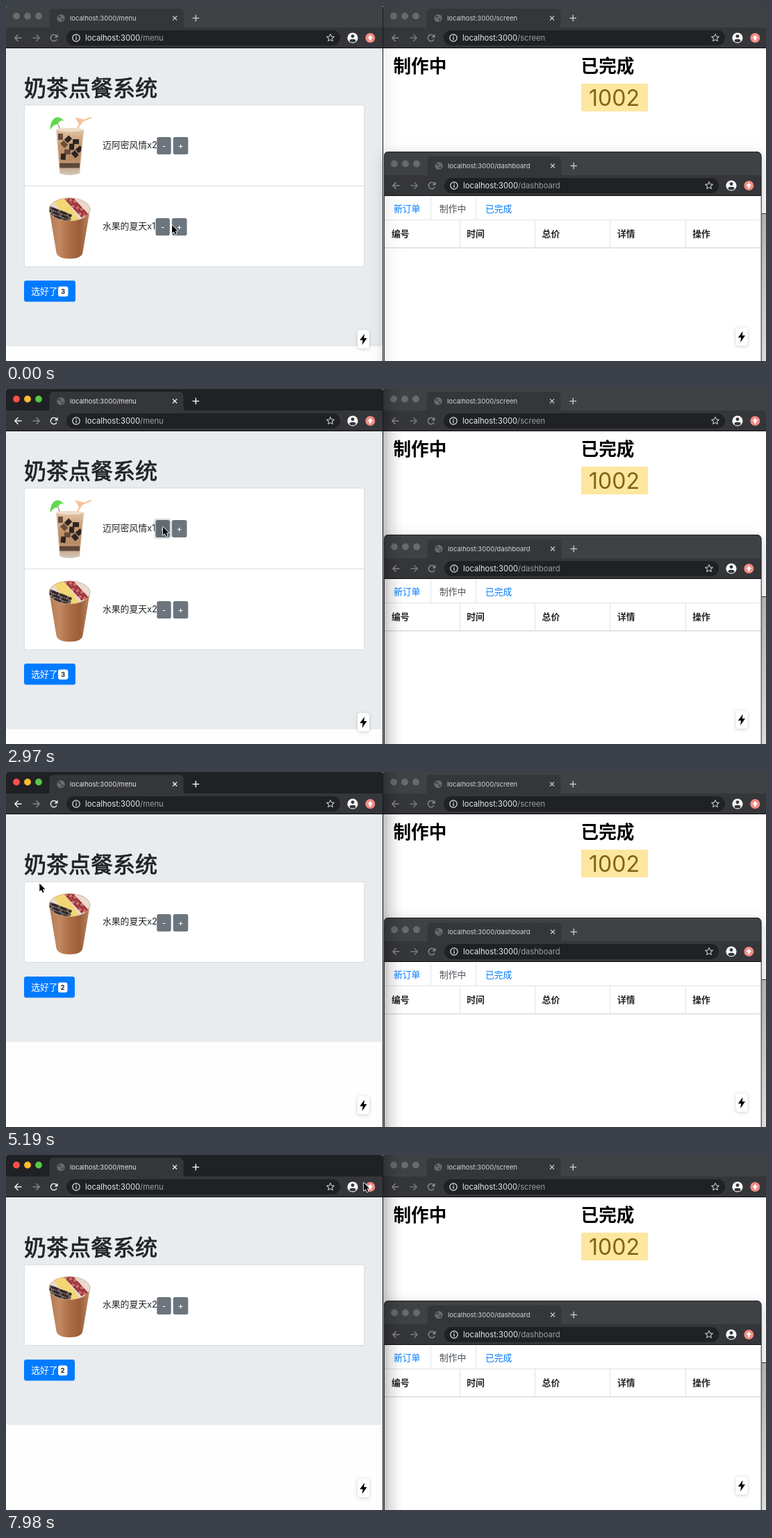
An HTML page with a canvas that plays this animation: 1094 px wide and 512 px high, repeating every 8000 ms.

```html
<!DOCTYPE html>
<html lang="zh-CN">
<head>
<meta charset="utf-8">
<title>奶茶点餐系统</title>
<style>
html, body { margin: 0; width: 100%; height: 100%; overflow: hidden; background: #fff; }
canvas { display: block; }
</style>
</head>
<body>
<canvas id="stage" width="1094" height="512"></canvas>
<script>
const g = document.getElementById('stage').getContext('2d');
const LOOP = 8000;
const FONT = 'Inter, "Noto Sans CJK SC", "Noto Sans CJK JP", "Noto Sans CJK", sans-serif';
const BLUE = '#007bff', INK = '#212529', BAR = '#35363a';

const clamp = v => Math.max(0, Math.min(1, v));
const ramp = (t, start, len) => clamp((t - start) / len);
const mix = (a, b, k) => 'rgb(' + a.map((v, i) => Math.round(v + (b[i] - v) * k)) + ')';

function rect(x, y, w, h, color) {
  g.fillStyle = color;
  g.fillRect(x, y, w, h);
}

function box(x, y, w, h, r, fill, stroke, lw = 1) {
  g.beginPath();
  g.roundRect(x, y, w, h, r);
  if (fill) { g.fillStyle = fill; g.fill(); }
  if (stroke) { g.strokeStyle = stroke; g.lineWidth = lw; g.stroke(); }
}

function disc(x, y, r, fill) {
  oval(x, y, r, r, fill);
}

function oval(x, y, rx, ry, fill, turn = 0) {
  g.beginPath();
  g.ellipse(x, y, rx, ry, turn, 0, 7);
  g.fillStyle = fill;
  g.fill();
}

function poly(pts, fill) {
  g.beginPath();
  for (let i = 0; i < pts.length; i += 2) g.lineTo(pts[i], pts[i + 1]);
  g.closePath();
  g.fillStyle = fill;
  g.fill();
}

function line(pts, color, lw = 1) {
  g.beginPath();
  for (let i = 0; i < pts.length; i += 2) g.lineTo(pts[i], pts[i + 1]);
  g.strokeStyle = color;
  g.lineWidth = lw;
  g.stroke();
}

function text(s, x, y, size, color, weight = 400, align = 'left') {
  g.font = `${weight} ${size}px ${FONT}`;
  g.textAlign = align;
  g.fillStyle = color;
  g.fillText(s, x, y);
  return g.measureText(s).width;
}

function at(x, y, draw) {
  g.save();
  g.translate(x, y);
  draw();
  g.restore();
}

function fade(x0, y0, x1, y1, ...colors) {
  const grad = g.createLinearGradient(x0, y0, x1, y1);
  colors.forEach((c, i) => grad.addColorStop(i / (colors.length - 1), c));
  return grad;
}

function arrow(x, y, dir, color) {
  at(x, y, () => {
    g.scale(dir, 1);
    line([-4.5, 0, 5, 0], color, 1.5);
    line([0, -4.7, -4.7, 0, 0, 4.7], color, 1.5);
  });
}

function star(x, y) {
  g.beginPath();
  for (let i = 0; i < 10; i++) {
    const a = i * Math.PI / 5 - Math.PI / 2, r = i % 2 ? 2.6 : 5.6;
    g.lineTo(x + r * Math.cos(a), y + r * Math.sin(a));
  }
  g.closePath();
  g.strokeStyle = '#c4c7ca';
  g.lineWidth = 1.1;
  g.stroke();
}

// Browser title bar and toolbar
function browser(x, y, w, path, active) {
  const lights = active ? ['#fd4f4b', '#fdbd2e', '#55c944'] : Array(3).fill('#686b6e');
  const icon = active ? '#f1f3f4' : '#8b8d90';
  const dim = active ? '#85878b' : '#777a7d';
  at(x, y, () => {
    box(0, -3, w, 40, [6, 6, 0, 0], active ? '#202124' : '#3f4245');
    rect(0, 31, w, 29, BAR);
    rect(0, 60, w, 1, '#0c0c0d');
    box(62.5, 4, 193, 28, [6, 6, 0, 0], BAR);
    lights.forEach((c, i) => disc(15 + 16 * i, 14.5, 4.9, c));

    disc(79, 17.5, 5.6, '#686b6f');
    oval(77, 15.5, 2.5, 1.5, '#45474a', .6);
    oval(81, 19.5, 2, 1.6, '#45474a', -.6);
    text('localhost:3000' + path, 92, 21, 9.5, active ? '#e4e6e8' : '#d2d4d6');
    const mark = active ? '#f1f3f4' : '#c5c7c9';
    line([240, 14.5, 246, 20.5], mark, 1.3);
    line([246, 14.5, 240, 20.5], mark, 1.3);
    line([268.5, 17.5, 278, 17.5], mark, 1.4);
    line([273.25, 12.8, 273.25, 22.2], mark, 1.4);

    arrow(17.5, 46, 1, icon);
    arrow(43.5, 46, -1, dim);
    g.beginPath();
    g.arc(69, 46, 4.6, .5, 5.5);
    g.strokeStyle = icon;
    g.lineWidth = 1.5;
    g.stroke();
    poly([74.5, 40.5, 74.5, 45.5, 69.5, 45.5], icon);

    box(87, 35, w - 148, 22, 11, '#202124');
    g.beginPath();
    g.arc(101, 46, 5.2, 0, 7);
    g.strokeStyle = '#e8eaed';
    g.lineWidth = 1.2;
    g.stroke();
    rect(100.4, 45.2, 1.3, 3.6, '#e8eaed');
    rect(100.4, 42.8, 1.3, 1.4, '#e8eaed');
    const tw = text('localhost:3000', 114, 50, 11.2, '#e8eaed');
    text(path, 114 + tw, 50, 11.2, '#9aa0a6');
    star(w - 75, 46);

    const a = w - 43, u = w - 17.7;
    disc(a, 46, 7.6, '#f6f7f8');
    disc(a, 43.6, 2.4, BAR);
    oval(a, 50, 4.5, 2.3, BAR);
    disc(u, 46, 7, '#f28b82');
    poly([u, 42, u + 4, 46.2, u + 1.6, 46.2, u + 1.6, 49.6, u - 1.6, 49.6, u - 1.6, 46.2, u - 4, 46.2], '#fff');
  });
}

function bolt(x, y) {
  g.save();
  g.shadowColor = 'rgba(0,0,0,.2)';
  g.shadowBlur = 5;
  g.shadowOffsetY = 1;
  box(x - 8.5, y - 13.5, 17, 26.5, 4, '#fff');
  g.restore();
  at(x, y, () => poly([1.5, -8, -5.2, 1.3, -.9, 1.3, -1.9, 8.3, 5, -1.7, .8, -1.7], '#000'));
}

function icedTea(x, y) {
  at(x, y, () => {
    line([-20, 21, -14, 38], '#8a6a4a', 1);
    g.beginPath();
    g.moveTo(-29, 36);
    g.bezierCurveTo(-29, 20, -19, 12, -9, 23);
    g.quadraticCurveTo(-15, 21, -18, 28);
    g.quadraticCurveTo(-24, 28, -29, 36);
    g.fillStyle = '#62d850';
    g.fill();
    line([8, 38, 16, 24, 30, 18], '#f4c8a0', 2.4);
    poly([7, 18, 19, 21, 14, 31], '#f7c29a');

    const cup = new Path2D('M-20 36H19L13 99Q-1 104-15 99Z');
    g.fillStyle = fade(0, 36, 0, 101, '#e0c3a2', '#c59a70', '#b98a62', '#d5c8bd');
    g.fill(cup);
    g.save();
    g.clip(cup);
    for (let i = 0; i < 9; i++) {
      at(-14 + (i * 11) % 28, 46 + i * 3.6, () => {
        g.rotate(i * .8);
        rect(-3.6, -4.6, 7, 9, i % 3 ? '#2b2425' : '#6a4b3a');
      });
    }
    rect(-17, 84, 34, 7, 'rgba(60,40,32,.75)');
    g.restore();
    oval(-.5, 36, 19.5, 2.8, '#eddcc8');
    line([-20, 36, -15, 99], '#e6d3c0', 1);
    line([19, 36, 13, 99], '#d3b79b', 1);
  });
}

function fruitTea(x, y) {
  at(x, y, () => {
    const cup = new Path2D('M-30 36L-20 96Q-18 105-1 105Q16 105 18 96L28 36Z');
    g.fillStyle = fade(-30, 0, 28, 0, '#b67a54', '#c28a62', '#ae6d45', '#9b5e3a', '#b98561');
    g.fill(cup);
    const lid = new Path2D();
    lid.ellipse(-1, 34, 29.5, 16.5, 0, 0, 7);
    g.fillStyle = '#ead9cd';
    g.fill(lid);
    g.save();
    g.clip(lid);
    poly([-24, 22, -10, 16, 14, 50, -3, 52], '#f3d672');
    // Berries lie in curved bands across the lid
    for (let i = 0; i < 30; i++) {
      const row = i % 3, k = Math.floor(i / 3);
      disc(-28 + k * 3.1 - row, 32 + row * 4.4 + k * 1.2, 2.3, i % 4 ? '#30292b' : '#66595a');
      disc(-6 + k * 2.5 + row * 4, 19 + k * 2.7 - row * .8, 2.1, i % 4 ? '#9c3038' : '#c96f70');
    }
    g.restore();
    g.strokeStyle = 'rgba(205,165,138,.8)';
    g.lineWidth = 1;
    g.stroke(lid);
  });
}

function smallButton(x, y, w, label, focus, dark) {
  if (focus > 0) box(x - 2.6, y - 2.6, w + 5.2, 30.2, 5, `rgba(130,138,145,${.5 * focus})`);
  box(x, y, w, 25, 2.8, mix([108, 117, 125], [90, 98, 104], Math.max(focus, dark)));
  text(label, x + w / 2, y + 16.6, 11.2, '#fff', 500, 'center');
}

function item(top, name, count, drink, minus, plus, hover) {
  drink(92.5, top);
  text(name + 'x' + count, 139, top + 62.2, 12.8, INK);
  const x = count === 1 ? 215.4 : 217.2, y = Math.round(top + 46.7);
  smallButton(x, y, 20.4, '-', minus, hover);
  smallButton(x + 23.4, y, 21.6, '+', plus, 0);
}

function menu(t, active) {
  const gone = t >= 4330;
  const n1 = t < 2920 ? 2 : t < 3650 ? 1 : 0;
  const n2 = t < 1400 ? 1 : 2;
  const total = n1 + n2;
  const top = gone ? 158 : 142.6, rows = gone ? 1 : 2, rh = 116.8;
  const end = top + rows * rh;

  rect(0, 61, 542, 451, '#fefefe');
  box(0, 61, 542, end + 53.7, [0, 0, 4, 4], '#e9ecef');

  g.font = `400 32px ${FONT}`;
  g.lineJoin = 'round';
  g.strokeStyle = INK;
  g.lineWidth = .9;
  g.textAlign = 'left';
  g.strokeText('奶茶点餐系统', 26, top - 13);
  text('奶茶点餐系统', 26, top - 13, 32, INK);

  box(26.3, top + .3, 489.6, rows * rh - .6, 2, '#fff', '#d7d9dc');
  if (!gone) {
    line([26, top + rh, 516, top + rh], '#d9dbdd');
    item(top, '迈阿密风情', n1, icedTea, ramp(t, 2910, 120), 0, 0);
  }
  const passing = ramp(t, 2080, 80) * (1 - ramp(t, 2220, 150));
  item(end - rh, '水果的夏天', n2, fruitTea, 0, t < 2920 ? ramp(t, 1390, 150) : 0, passing);

  const by = Math.round(end + 20), cut = total === 2 ? 1 : 0;
  const hover = ramp(t, 5640, 150) * (1 - ramp(t, 7500, 150));
  box(26, by, 74 - cut, 30.6, 3.4, mix([0, 123, 255], [0, 105, 217], hover));
  text('选好了', 36.2, by + 20, 12.8, '#fff', 500);
  box(75, by + 8.5, 14.4 - cut, 14.4, 3.2, '#fff');
  text(total, 82 - cut / 2, by + 19.2, 9.6, INK, 700, 'center');

  bolt(514.5, 480.8);
  browser(0, 0, 542, '/menu', active);
  rect(542, 0, 1, 512, '#17181a');
}

function screen() {
  rect(1080, 300, 14, 212, fade(0, 300, 0, 512, '#bdbdbd', '#d6d6d6', '#ececec'));
  rect(543, 0, 551, 299, '#fff');
  rect(1080, 299, 14, 1, '#333');
  browser(543, 0, 553, '/screen', false);
  text('制作中', 557.5, 95.6, 25.6, '#000', 700);
  text('已完成', 827.6, 95.6, 25.6, '#000', 700);
  rect(828, 112, 96, 40, '#fde69f');
  text('1002', 839, 144.2, 32, '#806511');
}

function dashboard() {
  g.save();
  g.shadowColor = 'rgba(0,0,0,.2)';
  g.shadowBlur = 18;
  g.shadowOffsetY = 5;
  box(544, 210, 543.5, 330, 6, '#fff');
  g.restore();
  browser(544, 213, 543, '/dashboard', false);
  rect(545, 274, 542, 238, '#fff');

  line([545, 308.5, 611.5, 308.5, 611.5, 275], '#dee2e6');
  line([676.5, 275, 676.5, 308.5, 1087, 308.5], '#dee2e6');
  text('新订单', 558, 296.6, 12.8, BLUE);
  text('制作中', 624, 296.6, 12.8, '#495057');
  text('已完成', 690, 296.6, 12.8, BLUE);

  line([545, 308.5, 1087, 308.5], '#dee2e6');
  rect(545, 348, 542, 1.5, '#d8dce1');
  ['编号', '时间', '总价', '详情', '操作'].forEach((s, i) => {
    const x = 544.8 + i * 108.3;
    if (i) rect(Math.floor(x), 309, 1, 39, '#dee2e6');
    text(s, x + 10.2, 333, 12.8, INK, 700);
  });
  bolt(1059, 477);
  box(544.5, 210.5, 542.7, 330, 6, null, '#202123');
}

function edgeShadow(alpha) {
  const tint = k => `rgba(0,0,0,${alpha * k})`;
  rect(543, 0, 30, 512, fade(543, 0, 573, 0, tint(1), tint(.45), tint(.15), tint(0)));
}

// Pointer path: time, x, y
const path = [
  [20, 239, 316], [140, 245, 318], [2060, 245, 318], [2190, 224, 300], [2240, 210, 264], [2560, 226, 199],
  [4630, 226, 199], [4900, 120, 170], [5080, 2, 151], [5190, 48, 160], [5430, 117, 343],
  [5870, 60.5, 310], [7490, 60.5, 310], [7700, 390, 165], [7860, 600, 70], [7980, 515, 40]
];

function pointer(t) {
  let i = 0;
  while (i < path.length - 2 && t >= path[i + 1][0]) i++;
  const [t0, x0, y0] = path[i], [t1, x1, y1] = path[i + 1];
  const k = ramp(t, t0, t1 - t0);
  return [x0 + (x1 - x0) * k, y0 + (y1 - y0) * k];
}

const ARROW = new Path2D('M0 0V11.6L2.7 9.2 4.5 13.2 6.4 12.4 4.7 8.5H8.2Z');
const HAND = new Path2D('M0 0Q1.6-.6 2 1.2L2.7 4.6Q4.2 3.8 4.7 5Q6.2 4.4 6.6 5.6Q8.2 5.2 8 7.4Q8 10 6.6 12.5H.6L-2.8 8Q-3.6 6.4-1.9 6.4L.2 8-1.1 1.4Q-1.2.3 0 0Z');

function cursor(t) {
  const [x, y] = pointer(t);
  const hand = t >= 5640 && t < 7530;
  const shape = hand ? HAND : ARROW;
  at(x, y, () => {
    g.lineJoin = 'round';
    g.strokeStyle = hand ? '#000' : '#fff';
    g.lineWidth = 1.6;
    g.stroke(shape);
    g.fillStyle = hand ? '#fff' : '#000';
    g.fill(shape);
  });
}

function draw(t) {
  const active = t >= 550;
  rect(0, 0, 1094, 512, '#fefefe');
  if (!active) menu(t, false);
  screen();
  dashboard();
  edgeShadow(.06 + .2 * ramp(t, 550, 60));
  if (active) menu(t, true);
  cursor(t);
}

function tick() {
  draw(performance.now() % LOOP);
  requestAnimationFrame(tick);
}
tick();
</script>
</body>
</html>
```
